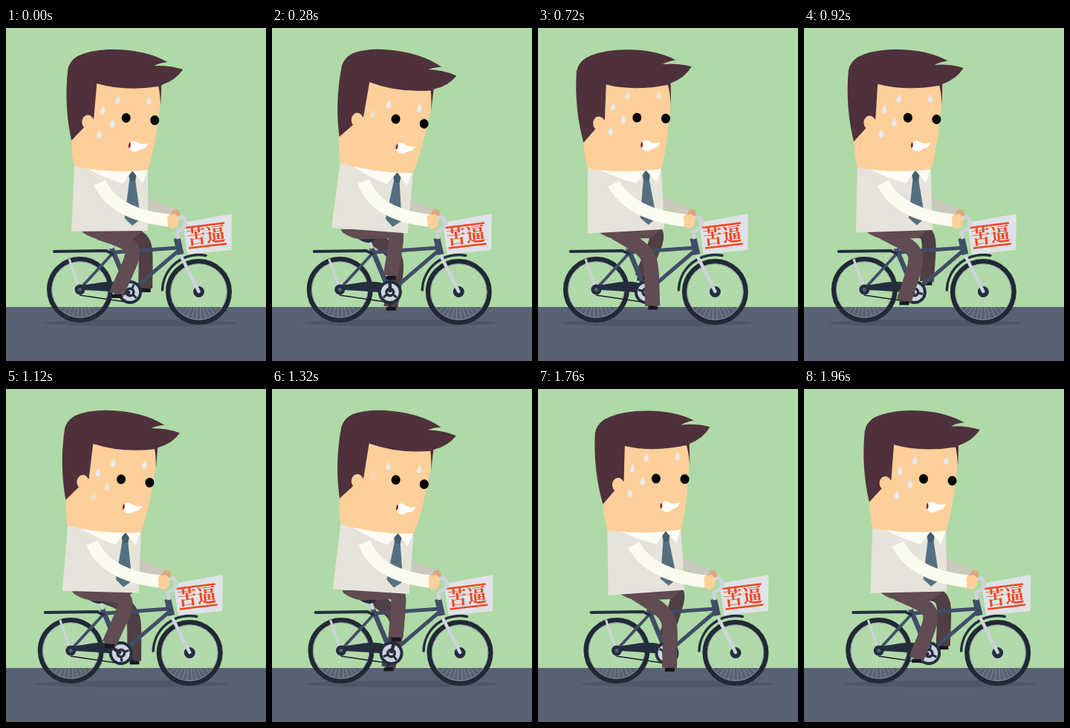
Animation of 350x450 px, one loop 2 s. Source, as an HTML page:

```html
<!DOCTYPE html>
<html lang="zh">
<head>
<meta charset="utf-8">
<title>Cyclist</title>
<style>
html, body { margin: 0; width: 100%; height: 100%; overflow: hidden; background: #afd9a6; }
svg { display: block; width: 350px; height: 450px; }
.line { fill: none; stroke-linejoin: round; }
.sign { font: 900 26px "Noto Serif CJK SC", "Noto Sans CJK SC", "Noto Sans CJK", serif; fill: #f4471f; }
</style>
</head>
<body>
<svg viewBox="0 0 350 450">
  <rect width="350" height="450" fill="#afd9a6"/>
  <rect y="377" width="350" height="73" fill="#596273"/>
  <g id="rider">
    <ellipse cx="181" cy="398.5" rx="129" ry="4.5" fill="#4d5768"/>

    <!-- far limbs -->
    <path id="farArm" class="line" stroke="#cbc8be" stroke-width="13"/>
    <rect x="223" y="245" width="11" height="13" rx="5" fill="#dca67a"/>
    <path id="farLeg" class="line" stroke="#4f3e44" stroke-width="19"/>
    <path id="farCrank" class="line" stroke="#252e3f" stroke-width="4"/>
    <path id="farPedal" class="line" stroke="#15181f" stroke-width="5"/>

    <!-- bicycle -->
    <g id="wheels"></g>
    <path class="line" stroke="#252e3f" stroke-width="3.5" stroke-linecap="round" d="M210.5 354A49 49 0 0 1 269 307.5"/>
    <path class="line" stroke="#1c2029" stroke-width="1.5" d="M99 361L160 370"/>
    <g class="line" stroke="#404d66">
      <path stroke-width="4" d="M143 305L100 352"/>
      <path stroke-width="5" d="M147 303L232 297M231 302L168 356"/>
      <path stroke-width="6.5" d="M142 297L167 357"/>
      <path stroke-width="9" d="M230 284L235 306"/>
    </g>
    <path class="line" stroke="#252e3f" stroke-width="4" stroke-linecap="round" d="M65 302L135 301L143 305"/>
    <path class="line" stroke="#ced3dc" stroke-width="3" d="M85 312L98 350"/>
    <path class="line" stroke="#ced3dc" stroke-width="4" d="M140 289L143 298"/>
    <path fill="#252e3f" d="M122 283L147 284Q147 289 138 290Q130 290 122 283Z"/>
    <path fill="#252e3f" d="M101 348L130 343.5Q152 341 162 347L160 358Q142 356 105 354Z"/>
    <circle cx="99.5" cy="353.5" r="7" fill="#252e3f"/>
    <circle cx="99.5" cy="353.5" r="2.5" fill="#596273"/>
    <circle cx="259.5" cy="356.5" r="7.5" fill="#252e3f"/>
    <path class="line" stroke="#ced3dc" stroke-width="4.5" stroke-linecap="round" d="M236 309L259.5 356"/>
    <circle cx="167" cy="357" r="16" fill="#252e3f"/>
    <circle cx="167" cy="357" r="12" fill="#ced3dc"/>
    <g id="spider" class="line">
      <circle r="6.5" fill="#252e3f"/>
      <path stroke="#252e3f" stroke-width="3" d="M0 0H12M0 0L-7 9M0 0L-7 -9"/>
      <circle r="3" fill="#ced3dc"/>
    </g>
    <path id="nearCrank" class="line" stroke="#252e3f" stroke-width="4.5"/>

    <!-- near leg -->
    <path fill="#604c52" d="M101 272L103 276Q112 283 126 285.500L172 284L187 272Z"/>
    <path id="nearLeg" class="line" stroke="#604c52" stroke-width="20"/>
    <path id="nearPedal" class="line" stroke="#15181f" stroke-width="5"/>

    <!-- sign -->
    <path fill="#dfe2e8" d="M238 263L304 251L303.5 300L244 306Z"/>
    <path class="line" stroke="#f4471f" stroke-width="2.5" d="M241 270L294 263.5M246 297.5L297 291.5"/>
    <text class="sign" transform="translate(244.5 293) rotate(-7)">苦逼</text>
    <path class="line" stroke="#ced3dc" stroke-width="5" d="M232 285L230 276L239 270Q245 263 237 255L231 257"/>

    <!-- torso and head -->
    <g id="body">
      <path fill="#e6e3da" d="M92 186L191 190V274L88 275Z"/>
      <path fill="#547080" d="M166 206H174L181.5 258L170 267L159.5 257Z"/>
      <path fill="#435e70" d="M165 198L170 193L175.5 198L174 207H166.5Z"/>
      <path fill="#fdfcf4" d="M104 187L170 193L157 210Q130 202 104 187ZM170 193L191 190L184 210Z"/>
      <path fill="#ffcf9a" d="M88 148Q88 170 92 187Q140 197 191 192Q203 155 209.5 78L150 60L112 75Z"/>
      <path fill="#4e313c" d="M88 152C82 125 79 92 83 56Q85 45 96 38Q112 30 138 29Q186 28 217 46Q207 47 199 51Q220 50 238 56Q228 71 209 77L208 105Q207 88 205 79Q160 86 122 75L118 122L105 134Z"/>
      <ellipse cx="110" cy="127" rx="8" ry="9.5" fill="#ffcf9a"/>
      <ellipse cx="161.5" cy="121.5" rx="6" ry="6.5"/>
      <ellipse cx="200" cy="124.5" rx="6" ry="6.5"/>
      <path fill="#8f2424" d="M167 154Q163.500 157 165.500 163L169 160Z"/>
      <path fill="#fff" d="M167 154.500Q172 151 177 154.500Q181 158 191 156Q189 163 181 164Q173 171 165.500 163Q169 160 167 154.500Z"/>
      <g id="drops"></g>
    </g>
    <path id="nearArm" class="line" stroke="#fcfbf0" stroke-width="17"/>
    <path fill="#ffcf9a" d="M217 254L227 251Q234 255 232 263Q231 272 222 271L218 268Z"/>
  </g>
</svg>
<script>
const $ = id => document.getElementById(id);
const rad = deg => deg * Math.PI / 180;
const mix = (p, q, k) => [p[0] + (q[0] - p[0]) * k, p[1] + (q[1] - p[1]) * k];
const draw = (id, d) => $(id).setAttribute("d", d);
const CRANK = [167, 357], PIVOT = [150, 275];

// x, y, time of appearing, time of vanishing
const DROPS = [[150, 97, 650, 1590], [192, 98, 650, 1590], [130, 111, 530, 1360],
  [143, 129, 440, 1230], [125, 144, 420, 1200]];

function wheel(x, y) {
  let spokes = "";
  for (let i = 0; i < 36; i++) {
    const a = rad(i * 10 + 5), b = a + (i % 2 ? 0.12 : -0.12);
    spokes += `M${x + 6 * Math.cos(b)} ${y + 6 * Math.sin(b)}L${x + 37 * Math.cos(a)} ${y + 37 * Math.sin(a)}`;
  }
  const ring = (r, color, width) =>
    `<circle class="line" cx="${x}" cy="${y}" r="${r}" stroke="${color}" stroke-width="${width}"/>`;
  return `<path class="line" d="${spokes}" stroke="#d4dae0" stroke-width=".6" opacity=".5"/>`
    + ring(41.3, "#222835", 6.4) + ring(37.8, "#8a929f", 1);
}

// Triangle wave: 1 at the peak time, -1 half a period later
function tri(t, period, peak) {
  const d = ((t - peak) / period % 1 + 1) % 1;
  return 1 - 4 * Math.min(d, 1 - d);
}

function turn([x, y], deg) {
  const c = Math.cos(rad(deg)), s = Math.sin(rad(deg));
  const dx = x - PIVOT[0], dy = y - PIVOT[1];
  return [PIVOT[0] + dx * c - dy * s, PIVOT[1] + dx * s + dy * c];
}

function leg(side, hip, deg) {
  const c = Math.cos(rad(deg)), s = Math.sin(rad(deg));
  const foot = [CRANK[0] + 20 * c + 1, CRANK[1] + 21 * s - 1];
  const dx = foot[0] - hip[0], dy = foot[1] - hip[1];
  const dist = Math.hypot(dx, dy), thigh = 55, shin = 72;
  const bend = Math.acos((thigh ** 2 + dist ** 2 - shin ** 2) / (2 * thigh * dist));
  const a = Math.atan2(dy, dx) - bend;
  const knee = [hip[0] + thigh * Math.cos(a), hip[1] + thigh * Math.sin(a)];
  // Control points near the knee give a soft bend
  draw(side + "Leg", `M${hip}C${mix(hip, knee, 1.15)} ${knee} ${foot}`);
  draw(side + "Crank", `M${CRANK}L${CRANK[0] + 21 * c} ${CRANK[1] + 21 * s}`);
  draw(side + "Pedal", `M${foot[0] - 6} ${foot[1] + 2.5}h13`);
}

function arm(id, shoulder, elbow, hand, lean) {
  draw(id, `M${turn(shoulder, lean)}Q${turn(elbow, lean / 2)} ${hand}`);
}

function render(t) {
  const lean = .63 + 4.37 * tri(t, 1000, 282);
  const pedal = .36 * (t - 280) - 90;
  $("rider").setAttribute("transform", `translate(${-7.9 + 14.65 * tri(t, 2000, 1770)} 0)`);
  $("body").setAttribute("transform", `rotate(${lean} ${PIVOT})`);
  $("spider").setAttribute("transform", `translate(${CRANK}) rotate(${pedal})`);
  leg("near", [125, 276], pedal);
  leg("far", [133, 276], pedal + 180);
  arm("nearArm", [126, 209], [146, 252], [219, 260], lean);
  arm("farArm", [170, 225], [195, 240], [227, 251], lean);
  DROPS.forEach(([x, y, from, to], i) => {
    const age = ((t - from) % 1000 + 1000) % 1000, now = from + age;
    const alpha = Math.max(0, Math.min(1, age / 110, (to - now) / 150));
    const drop = $("drops").children[i];
    drop.setAttribute("transform", `translate(${x} ${y + .021 * (now - 1000)})`);
    drop.setAttribute("opacity", alpha);
  });
}

$("wheels").innerHTML = wheel(99.5, 353.5) + wheel(259.5, 356.5);
$("drops").innerHTML = DROPS.map(() =>
  '<path fill="#e5eaed" d="M.5 -6Q4 0 3.2 3Q2 6 -.5 5.5Q-4 5 -3.2 1Q-2 -2 .5 -6Z"/>').join("");

const start = performance.now();
function tick() {
  const t = (performance.now() - start) % 2000;
  render(Math.floor(t / 40) * 40);
  requestAnimationFrame(tick);
}
tick();
</script>
</body>
</html>
```
